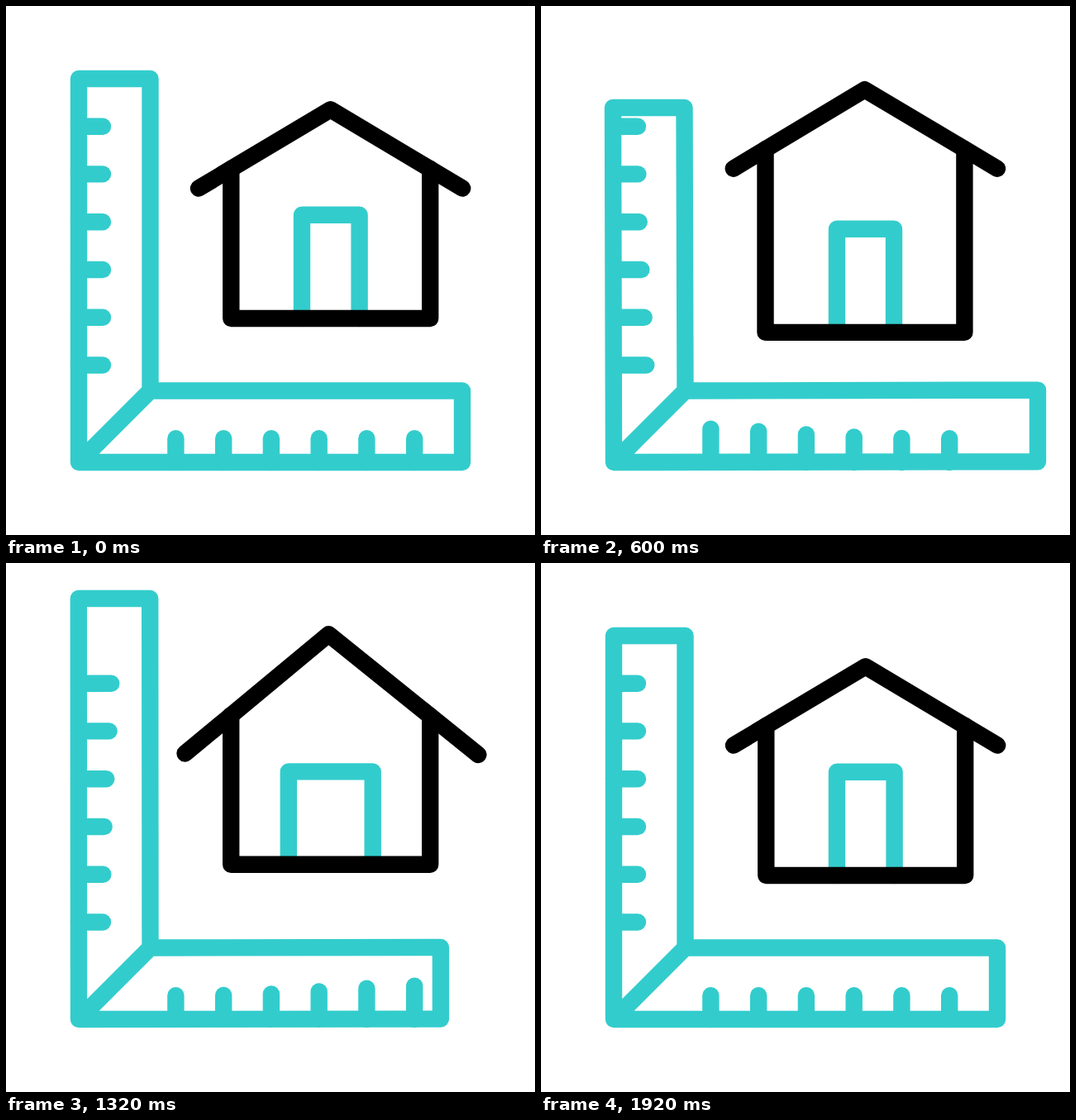
An HTML page without scripts that plays this animation: 640x640 px, repeating every 2 s.

```html
<!DOCTYPE html>
<html lang="en">
<head>
<meta charset="utf-8">
<title>House plan</title>
<style>
html, body { margin: 0; width: 100%; height: 100%; overflow: hidden; background: #fff; }
svg { display: block; width: 100%; height: 100%; }
path {
  fill: none; stroke: #3cc; stroke-width: 20.4;
  stroke-linecap: round; stroke-linejoin: round;
  animation: 2s cubic-bezier(.5, 0, .5, 1) infinite;
}
.house path { stroke: #000; }

.ruler { animation-name: ruler; animation-timing-function: cubic-bezier(.6, 0, .4, 1); }
.door { animation-name: door; }
.house .walls { animation-name: walls; }
.house .roof { animation-name: roof; }
.side path { animation-name: side; }
.foot path { animation-name: foot; }

/* ticks follow each other outward from the corner */
g > :nth-child(2) { --i: 1; }
g > :nth-child(3) { --i: 2; }
g > :nth-child(4) { --i: 3; }
g > :nth-child(5) { --i: 4; }
g > :nth-child(6) { --i: 5; }
.side path, .foot path { animation-delay: calc(var(--i, 0) * 80ms); }

@keyframes ruler {
  0%, 6%, 90%, 100% { d: path("M88 552L88 88L174.5 88L174.5 465.5L552 465.5L552 552L88 552L174.5 465.5"); }
  30% { d: path("M88 552L87 123L173.5 123L174.5 465.5L601 464.6L601 551.2L88 552L174.5 465.5"); }
  62% { d: path("M88 552L87.8 42L174.2 42L174.5 465.5L525.3 465L525.3 551.6L88 552L174.5 465.5"); }
}
@keyframes door {
  0%, 4%, 96%, 100% { d: path("M358 378L358 252.8L427.6 252.8L427.6 378"); }
  32% { d: path("M358 395L358 269.8L427 269.8L427 395"); }
  64% { d: path("M341.7 364.6L341.7 252.4L443.8 252.4L443.8 364.6"); }
}
@keyframes walls {
  0%, 4%, 96%, 100% { d: path("M272.3 197L272.3 378L513.2 378L513.2 197"); }
  32% { d: path("M271.5 173L271.5 395L512.4 395L512.4 173"); }
  64% { d: path("M272.2 184L272.2 364.6L513.2 364.6L513.2 185"); }
}
@keyframes roof {
  0%, 4%, 96%, 100% { d: path("M233 220.5L392.6 125.2L552.2 220.5"); }
  32% { d: path("M232.8 196.5L391.6 101L552 196.5"); }
  64% { d: path("M216.5 230.5L390.3 86L571.5 232"); }
}
@keyframes side {
  0%, 10%, 66%, 100% { d: path("M0 0L29 0"); }
  38% { d: path("M0 0L41 0"); }
}
@keyframes foot {
  0%, 10%, 66%, 100% { d: path("M0 0L0 -28.7"); }
  38% { d: path("M0 0L0 -42.2"); }
}
</style>
</head>
<body>
<svg viewBox="0 0 640 640">
  <path class="ruler" d="M88 552L88 88L174.5 88L174.5 465.5L552 465.5L552 552L88 552L174.5 465.5"/>
  <g class="side">
    <path transform="translate(88 434.5)" d="M0 0L29 0"/>
    <path transform="translate(88 376.7)" d="M0 0L29 0"/>
    <path transform="translate(88 319)" d="M0 0L29 0"/>
    <path transform="translate(88 261.2)" d="M0 0L29 0"/>
    <path transform="translate(88 203.4)" d="M0 0L29 0"/>
    <path transform="translate(88 145.7)" d="M0 0L29 0"/>
  </g>
  <g class="foot">
    <path transform="translate(205.4 552)" d="M0 0L0 -28.7"/>
    <path transform="translate(263.2 552)" d="M0 0L0 -28.7"/>
    <path transform="translate(320.9 552)" d="M0 0L0 -28.7"/>
    <path transform="translate(378.7 552)" d="M0 0L0 -28.7"/>
    <path transform="translate(436.4 552)" d="M0 0L0 -28.7"/>
    <path transform="translate(494.2 552)" d="M0 0L0 -28.7"/>
  </g>
  <path class="door" d="M358 378L358 252.8L427.6 252.8L427.6 378"/>
  <g class="house">
    <path class="walls" d="M272.3 197L272.3 378L513.2 378L513.2 197"/>
    <path class="roof" d="M233 220.5L392.6 125.2L552.2 220.5"/>
  </g>
</svg>
</body>
</html>
```
